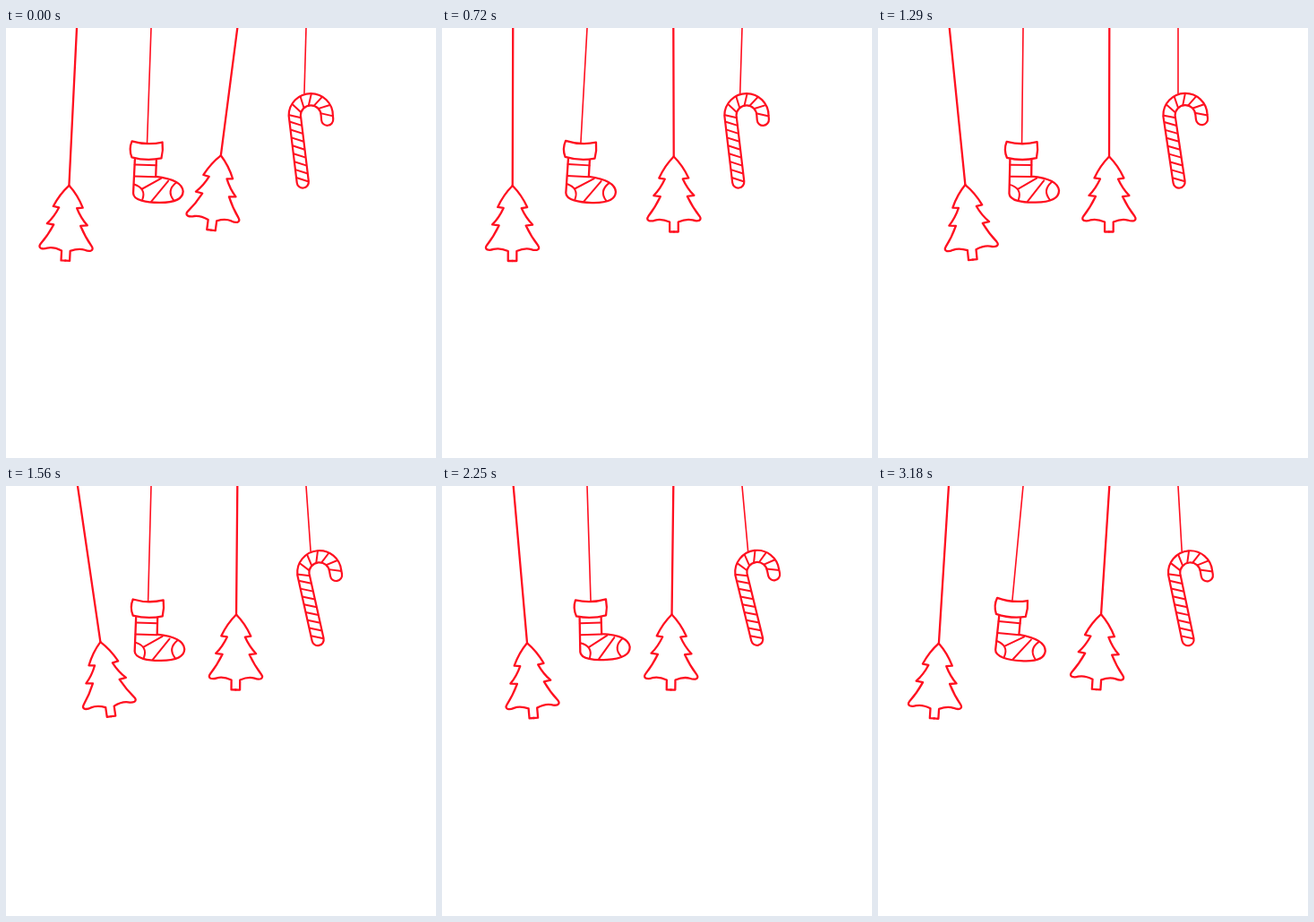
Recreate the animation shown at these times as an HTML page. Size 480 px wide and 480 px high, loop 3210 ms.

```html
<!DOCTYPE html>
<html lang="en">
<head>
<meta charset="utf-8">
<title>Hanging ornaments</title>
<style>
  html, body { margin: 0; width: 100%; height: 100%; overflow: hidden; background: #fff; }
  svg { display: block; width: 100vw; height: 100vh; }
  g { fill: none; stroke: #ff1020; stroke-width: 2.3; stroke-linejoin: round; stroke-linecap: round; }
  .thin { stroke-width: 1.6; }
  .band { stroke-width: 2; }
</style>
</head>
<body>
<!-- Every ornament hangs from its own origin; the script moves it to its pivot. -->
<svg viewBox="0 0 480 480">
  <defs>
    <path id="half" d="M0 0Q10 10 16.500 24L10 25Q15 36 22.500 43.500L15 44.500Q21 57 28.500 66.500Q31 70 28 71.500Q25 72.500 21 71Q14 69 4.800 73V84H0"/>
    <g id="tree"><use href="#half"/><use href="#half" transform="scale(-1 1)"/></g>
  </defs>

  <g id="leftTree">
    <path d="M0 -10V181"/>
    <use href="#tree" y="181"/>
  </g>

  <g id="stocking">
    <path class="thin" d="M0 -10V128"/>
    <path d="M-17 127Q0 131.500 17 127Q18.500 136 16.500 145Q0 149 -16.500 145Q-20.500 136 -17 127Z"/>
    <path d="M-13 147L-13.500 185C-13 193 2 195 16 194.500C33 194 42 189 42 181C41 172 30 167 11 165.500V147"/>
    <path class="band" d="M-13 153H11M-13 166H11M-13 175Q1 179 -3 191.500M-4 180L17 167.500M7 193.500L25 170M34 171.500Q23 181 32 191.500"/>
  </g>

  <g id="rightTree">
    <path d="M0 -10V143.500"/>
    <use href="#tree" y="143.500"/>
  </g>

  <g id="cane">
    <path class="thin" d="M0 -10V73"/>
    <path id="tube" d="M1.100 172L-10 98A18 18 0 0 1 26 97L26.500 101.500" stroke-width="15.400"/>
    <use href="#tube" id="hollow"/>
    <path d="M1.100 172L-10 98A18 18 0 0 1 26 97L26.500 101.500" stroke="#fff" stroke-width="11"/>
    <path id="stripes" class="band" stroke-linecap="butt"/>
  </g>
</svg>

<script>
const LOOP = 3210, STEP = 30;

// Drifting swing: degrees to the right at shared key times
const times = [0, 240, 420, 1050, 1560, 2250, 2760, 3180];
const swings = {
  leftTree:  { pivot: [79.25, -5], angles: [-2.8, -2.6, -2.1, 2.9, 8.3, 5, 6, -3.6] },
  stocking:  { pivot: [162, 0],    angles: [-2, -4.3, -5.2, -0.1, -1.5, 1.8, -3, -5.4] },
  rightTree: { pivot: [258.3, 0],  angles: [-7.4, -3.3, -1.2, 0.1, -0.5, -0.7, -1.6, -3.7] },
  cane:      { pivot: [335, 0],    angles: [-1.6, 2.3, 1, -3, 4, 5.2, 0.3, 3.3] }
};

const $ = id => document.getElementById(id);

function caneStripes() {
  const polar = (r, deg) => {
    const a = deg * Math.PI / 180;
    return `${8 + r * Math.cos(a)} ${97.5 - r * Math.sin(a)}`;
  };
  let d = "";
  for (let a = 0; a <= 180; a += 30) d += `M${polar(25, a)}L${polar(11, a + 15)}`;
  for (let y = 107; y < 171; y += 8.9) {
    const x = (y - 98) * 0.15 - 10;
    d += `M${x - 7} ${y - 2}L${x + 7} ${y + 2}`;
  }
  return d;
}

// Smooth curve through the keys; each slope blends the two neighbouring ones
function angleAt(angles, t) {
  const last = times.length - 1;
  const secant = i => (angles[i + 1] - angles[i]) / (times[i + 1] - times[i]);
  const slope = i => {
    if (i === 0) return secant(0);
    if (i === last) return secant(last - 1);
    const mix = (times[i] - times[i - 1]) / (times[i + 1] - times[i - 1]);
    return secant(i - 1) * (1 - mix) + secant(i) * mix;
  };
  let i = 0;
  while (i < last - 1 && t > times[i + 1]) i++;
  const h = times[i + 1] - times[i], u = (t - times[i]) / h, w = 1 - u;
  return angles[i] * w * w * (1 + 2 * u) + angles[i + 1] * u * u * (3 - 2 * u)
    + h * u * w * (w * slope(i) - u * slope(i + 1));
}

function draw(now) {
  const t = Math.floor(now % LOOP / STEP) * STEP;
  for (const [id, { pivot, angles }] of Object.entries(swings)) {
    $(id).setAttribute("transform", `translate(${pivot}) rotate(${-angleAt(angles, t)})`);
  }
}

function tick() {
  draw(performance.now() - start);
  requestAnimationFrame(tick);
}

$("hollow").remove();
$("stripes").setAttribute("d", caneStripes());
const start = performance.now();
tick();
</script>
</body>
</html>
```
